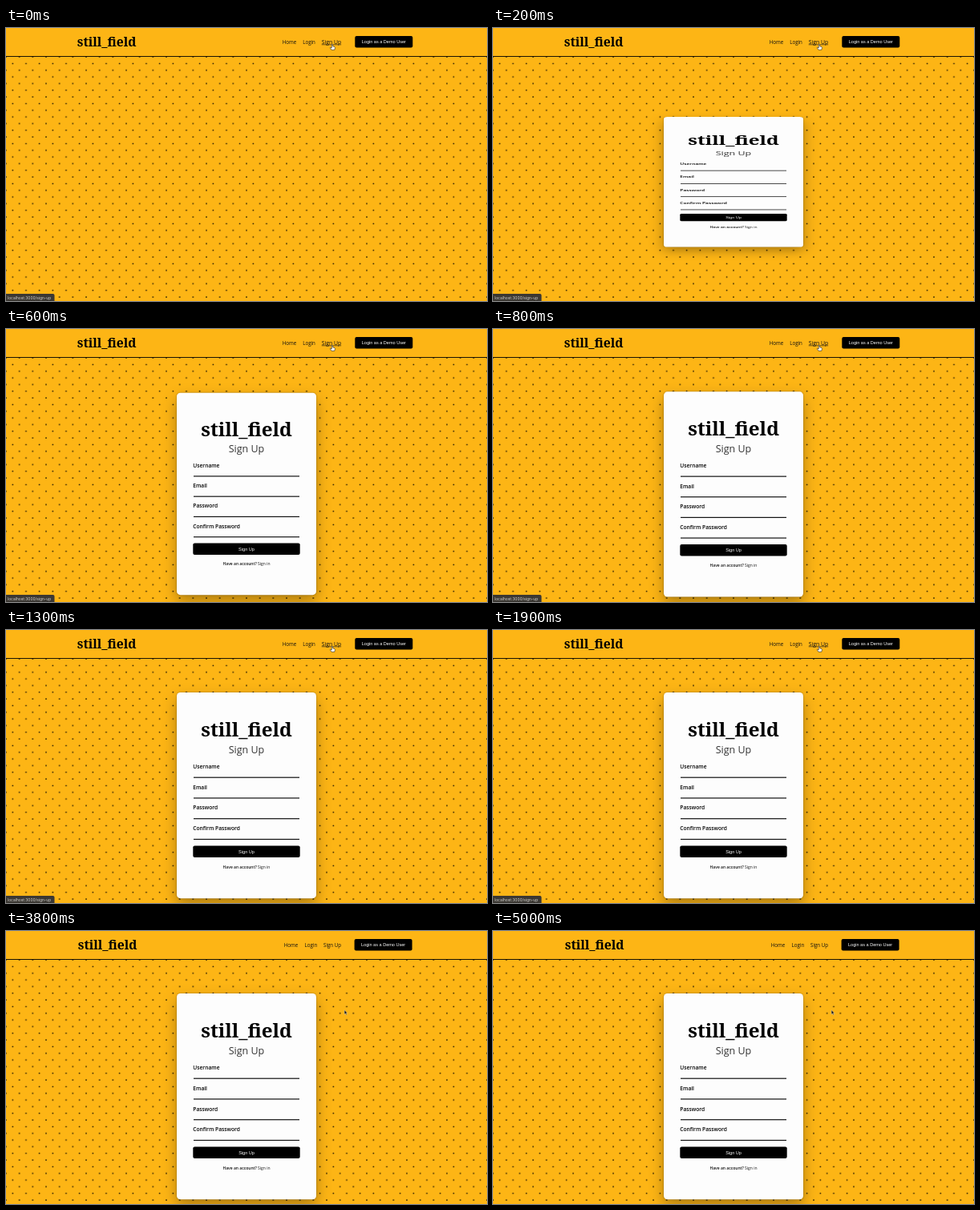
Write an HTML page that moves like this. It is 600x341 px and loops after 5100 ms.

```html
<!DOCTYPE html>
<html lang="en">
<head>
<meta charset="utf-8">
<title>Sign Up</title>
<style>
html, body { margin: 0; width: 100%; height: 100%; overflow: hidden; background: #fdb515; }
svg { display: block; width: 600px; height: 341px; }
text { font-family: "Open Sans", sans-serif; fill: #111; }
.brand { font: 700 15.7px "Noto Serif", serif; fill: #000; }
.nav { font-size: 6.2px; }
.button { font: 5.556px "Liberation Sans", Arial, sans-serif; fill: #fff; text-anchor: middle; }
.label { font-size: 6.67px; font-weight: 600; fill: #000; }
.panel { fill: #fdfdfd; filter: drop-shadow(0 0 1px rgba(0,0,0,.3)) drop-shadow(0 8px 9px rgba(0,0,0,.3)); }
.mid { text-anchor: middle; }
</style>
</head>
<body>
<svg viewBox="0 0 600 341">
  <defs>
    <pattern id="dots" y="36" width="16.667" height="16.667" patternUnits="userSpaceOnUse">
      <g id="dotset">
        <circle cx="8.333" cy="8.333" r=".85"/>
        <circle r=".85"/>
        <circle cx="16.667" r=".85"/>
        <circle cy="16.667" r=".85"/>
        <circle cx="16.667" cy="16.667" r=".85"/>
      </g>
    </pattern>
  </defs>
  <rect width="600" height="341" fill="#fdb515"/>
  <rect y="35" width="600" height="306" fill="url(#dots)"/>
  <rect y="35" width="600" height="1" fill="#1a1303"/>

  <text id="logo" class="brand" y="22.6">still_field</text>
  <text id="home" class="nav" y="19.9">Home</text>
  <text id="login" class="nav" y="19.9">Login</text>
  <g id="signup">
    <text class="nav">Sign Up</text>
    <rect id="rule" y=".7" width="22" height=".55" fill="#111"/>
  </g>
  <g id="demo">
    <rect y="10" width="72" height="14.6" rx="2"/>
    <text class="button" x="36" y="19.3">Login as a Demo User</text>
  </g>

  <g id="card">
    <rect class="panel" x="213" y="78" width="174" height="257.2" rx="4.5"/>
    <text class="brand mid" x="300" y="133.2" style="font-size:24.2px">still_field</text>
    <text class="mid" x="300" y="154" style="font-size:12.5px;fill:#333">Sign Up</text>
    <g id="fields"></g>
    <rect x="233.3" y="269.4" width="133.4" height="14.6" rx="2"/>
    <text class="button" x="300" y="278.6">Sign Up</text>
    <text class="mid" x="300" y="297.7" style="font-size:5px"><tspan font-weight="600">Have an account?</tspan> Sign in</text>
  </g>

  <g id="status">
    <path d="M0 332H58.5Q60.5 332 60.5 334V341H0Z" fill="#3b3833"/>
    <text x="2" y="338.6" style="font:4.9px Inter,sans-serif;fill:#d4d2ce">localhost:3000/sign-up</text>
  </g>

  <g id="pointer" stroke-linejoin="round">
    <path id="hand" d="M-.7 .6Q0-.5 .7 .6V2.6L3 3.2Q3.6 3.5 3.5 4.4L2.8 7H-1L-2.6 4.6Q-2.9 3.6-1.9 3.9L-.7 4.7Z" fill="#fff" stroke="#222" stroke-width=".6"/>
    <path id="arrow" d="M0 0V5.2L1.2 4.2L2 6L2.9 5.6L2.1 3.8H3.6Z" fill="#111" stroke="#fff" stroke-width=".35"/>
  </g>
</svg>
<script>
const LOOP = 5100, STEP = 100;
const $ = id => document.getElementById(id);
const clamp = v => Math.min(1, Math.max(0, v));
const ramp = (t, from, to) => clamp((t - from) / (to - from));
const mix = (a, b, p) => a + (b - a) * p;
const easeOut = p => 1 - (1 - p) * (1 - p);
const smooth = p => p * p * (3 - 2 * p);
const move = (id, x, y, extra = "") => $(id).setAttribute("transform", `translate(${x} ${y})${extra}`);

$("fields").innerHTML = ["Username", "Email", "Password", "Confirm Password"].map((name, i) => {
  const y = 173 + i * 25.75;
  return `<text class="label" x="233.3" y="${y}">${name}</text>
    <rect x="234" y="${y + 10.6}" width="132" height="1.2" fill="#111"/>`;
}).join("");

function draw(t) {
  // the card unfolds vertically around a fixed line
  const open = t < 67 ? 0 : 1 - Math.exp((67 - t) / 133);
  $("card").setAttribute("display", open ? "inline" : "none");
  move("card", 0, 167.7 * (1 - open), ` scale(1 ${open})`);

  // the hovered link is larger and pushes the header apart
  const rest = smooth(ramp(t, 2480, 2720));
  $("logo").setAttribute("x", mix(88.8, 89.8, rest));
  $("home").setAttribute("x", mix(344.8, 346.8, rest));
  $("login").setAttribute("x", mix(370.2, 372.5, rest));
  move("signup", mix(393.7, 396, rest), mix(19.8, 19.9, rest), ` scale(${mix(1.11, 1, rest)})`);
  move("demo", mix(435.3, 434.6, rest), 0);
  const hover = t < 2550;
  $("rule").setAttribute("opacity", hover ? 1 : 0);

  $("status").setAttribute("opacity", 1 - ramp(t, 2900, 3200));

  const p = easeOut(ramp(t, 2400, 3200));
  move("pointer", mix(407, 422.2, p), mix(20.3, 98.8, p));
  $("hand").setAttribute("opacity", hover ? 1 : 0);
  $("arrow").setAttribute("opacity", hover ? 0 : 1);
}

const start = performance.now();
function tick() {
  const t = (performance.now() - start) % LOOP;
  draw(Math.floor(t / STEP) * STEP);
  requestAnimationFrame(tick);
}
tick();
</script>
</body>
</html>
```
